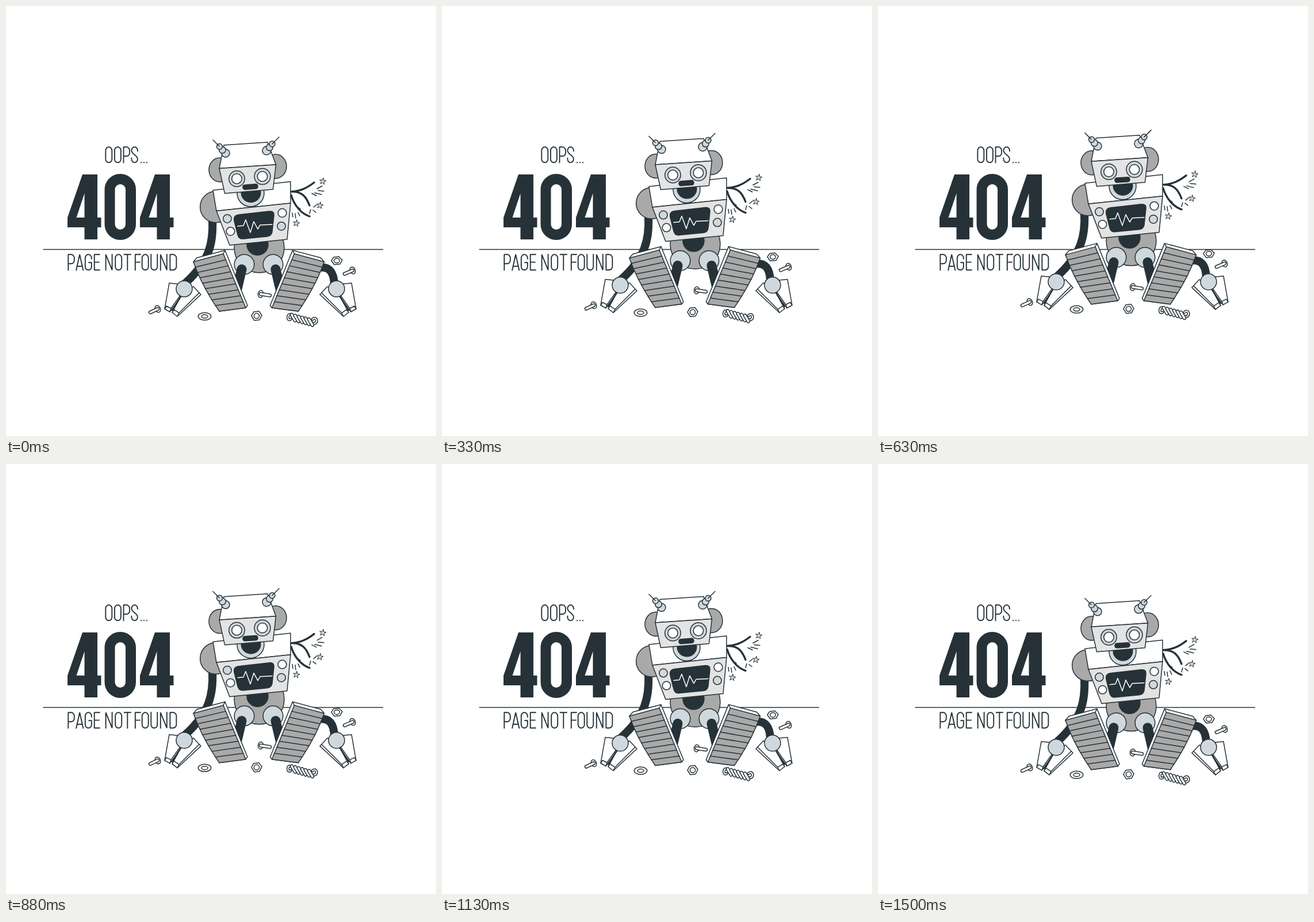
An HTML page for the animation above (1540 ms loop, 748x748 px).

```html
<!DOCTYPE html>
<html lang="en">
<head>
<meta charset="utf-8">
<title>Page not found</title>
<style>
  html, body { margin: 0; width: 100%; height: 100%; overflow: hidden; background: #fff; }
  svg { display: block; width: 100%; height: 100%; }
  #robot { fill: #fff; stroke: #263238; stroke-width: 1.5; stroke-linejoin: round; stroke-linecap: round; }
  .grey { fill: #a9a9a9; }
  .pale { fill: #e3e3e3; }
  .blue { fill: #cfd8dc; }
  .dark { fill: #263238; }
  .line { fill: none; }
  .limb { fill: none; stroke-width: 14; }
  .leg { fill: none; stroke-width: 17; }
  .wire { fill: none; stroke-width: 3.4; }
  .lettering { fill: none; stroke: #263238; stroke-width: 1.9; stroke-linecap: square; stroke-linejoin: bevel; }
</style>
</head>
<body>
<svg viewBox="0 0 748 748" role="img" aria-label="OOPS... 404 PAGE NOT FOUND">
  <defs>
    <g id="boot">
      <path d="M326 445L332 438 381 425 420 521 417 525 371 531Z"/>
      <path class="grey" d="M326 445L378 431 417 525 371 531Q340 486 326 445Z"/>
      <path class="line" d="M378 431L381 425"/>
      <path class="line" id="treads"/>
    </g>
    <g id="hand">
      <path d="M284 482L276 527 285 532 309 500 304 484Z"/>
      <path d="M306 502L289 533 298 540 339 502 326 488Z"/>
      <path class="line" d="M276 527L279 522 287 526 285 532M287 526L304 502M289 533L292 528 301 534 298 540M301 534L336 499"/>
      <path class="line" stroke-width="2.5" d="M305 504L289 529"/>
      <circle class="blue" cx="310" cy="492" r="14"/>
    </g>
  </defs>

  <g class="dark">
    <path id="four" fill-rule="evenodd" d="M133 293H159V368H165.5V385H159V406H136.5V385H107V368ZM136.5 326L122.5 368H136.5Z"/>
    <use href="#four" x="126"/>
  </g>
  <rect x="180.500" y="301" width="36.500" height="97" rx="18.200" fill="none" stroke="#263238" stroke-width="18"/>
  <path d="M64.5 423.500H656" stroke="#263238" stroke-width="1.500"/>
  <g class="lettering" id="lettering"></g>

  <g id="robot">
    <path class="limb" d="M359 372C361 412 354 444 312 482"/>
    <circle class="grey" cx="365" cy="349.500" r="27.300"/>

    <path class="wire" d="M496 323C512 322 523 317 536 307M496 323C514 322 522 331 528 347M496 329C501 346 513 361 528 366"/>
    <path class="line" d="M541 318L550 313M543 321L553 322M537 325L549 328M532 326L540 330M535 350L540 346M534 355L539 359M530 354L528 361M506 349L512 353M508 359L511 365M503 361L504 369M498 360L499 367"/>
    <g class="blue" id="stars" stroke-width="1"></g>

    <circle class="grey" cx="440.500" cy="420.500" r="43.500"/>
    <circle class="dark" cx="437.500" cy="415" r="18.500"/>
    <circle class="blue" cx="414.500" cy="449.500" r="17.300"/>
    <circle class="blue" cx="464.500" cy="449.500" r="17.300"/>
    <path class="leg" d="M410 458L402 492M469 458L477 492"/>

    <path d="M360 320.500L495 305.500V343L366 356.500Z"/>
    <path class="pale" d="M366 356.500L495 343 489 406 389 416Z"/>
    <path class="dark" d="M405 363L458 357Q467 356 466 365L463 393Q462 400 454 401L413 405Q405 406 403 398L397 374Q395 364 405 363Z"/>
    <path class="line" style="stroke:#fff" d="M403 383L413 382 417 372 425 394 431 375 438 388 442 381 463 380"/>
    <circle class="blue" cx="385" cy="370" r="7.200"/>
    <circle cx="390.500" cy="392" r="7.200"/>
    <circle cx="480.500" cy="360" r="7.400"/>
    <circle class="blue" cx="479" cy="383" r="7.200"/>

    <circle class="blue" cx="425.500" cy="325.500" r="23.500"/>
    <circle class="dark" cx="426" cy="324.500" r="16.800"/>
    <ellipse class="grey" cx="372" cy="285" rx="19" ry="21"/>
    <ellipse class="grey" cx="469" cy="279" rx="19" ry="21"/>
    <path d="M379 242L455 237 469.500 276 371 282.500Z"/>
    <path class="pale" d="M371 282.500L469.500 276 464.500 319 380.500 326Z"/>
    <circle class="blue" cx="401.500" cy="300.500" r="13.700"/>
    <circle cx="401.500" cy="300.500" r="8.700"/>
    <circle class="blue" cx="446" cy="296.500" r="14"/>
    <circle cx="446" cy="296.500" r="8.700"/>
    <rect class="dark" x="412" y="310.500" width="26" height="8" rx="3.500" transform="rotate(-4 425 314.500)"/>

    <g class="blue">
      <circle cx="382" cy="256" r="7"/><circle cx="376.500" cy="250.500" r="5.800"/><circle cx="371.500" cy="244.500" r="5"/>
      <circle cx="453.500" cy="251.500" r="7.500"/><circle cx="458.500" cy="246" r="5.800"/><circle cx="463" cy="240" r="5"/>
      <path class="line" d="M360 233L371 244M475 228L463 240"/>
    </g>

    <path class="limb" d="M546 455Q570 452 571 484"/>
    <use href="#boot"/>
    <use href="#boot" transform="matrix(-1 0 0 1 879.500 0)"/>
    <use href="#hand"/>
    <use href="#hand" transform="matrix(-1 0 0 1 885 0)"/>

    <path d="M566 443L570 437 579 436 585 442 581 449 571 450Z"/>
    <ellipse cx="575.500" cy="443" rx="4.800" ry="4"/>
    <path d="M427 539L431 532 440 531 445 538 441 546 432 547Z"/>
    <circle cx="436" cy="539" r="4.600"/>
    <ellipse cx="345.500" cy="540" rx="11.200" ry="6.500"/>
    <ellipse cx="345.500" cy="540" rx="5.500" ry="3"/>
    <g id="parts"></g>
  </g>
</svg>
<script>
const $ = id => document.getElementById(id);

// Condensed monoline capitals, 27 units high: [advance, path]
const glyphs = {
  O: [15.6, 'M0 6a5.5 6 0 0 1 11 0V21a5.5 6 0 0 1-11 0z'],
  P: [13.9, 'M0 27V0H5a5.5 6 0 0 1 5.5 6V10a5.5 6 0 0 1-5.5 6H0'],
  S: [13.6, 'M10.5 7V6a5.2 6 0 0 0-10.5 0C0 13 10.5 14 10.5 21a5.2 6 0 0 1-10.5 0v-1.5'],
  A: [15.6, 'M0 27L6 0 12 27M1.5 20.5H10.5'],
  G: [15.9, 'M11 7.5V6a5.5 6 0 0 0-11 0V21a5.5 6 0 0 0 11 0V14H6.5'],
  E: [13.4, 'M9 0H0V27H9M0 13.3H8'],
  N: [16.6, 'M0 27V0L11 27V0'],
  T: [12.5, 'M0 0H11M5.5 0V27'],
  F: [11.9, 'M9 0H0V27M0 13.3H8'],
  U: [16.5, 'M0 0V21a5.5 6 0 0 0 11 0V0'],
  D: [13, 'M0 0H5a6 6 0 0 1 6 6V21a6 6 0 0 1-6 6H0z'],
  '.': [5, 'M3 26.9V27'],
  ' ': [6.5, '']
};

function letter(text, x, y) {
  for (const char of text) {
    const [advance, d] = glyphs[char];
    $('lettering').innerHTML += `<path transform="translate(${x} ${y})" d="${d}"/>`;
    x += advance;
  }
}

function star(x, y) {
  const points = Array.from({ length: 10 }, (_, i) => {
    const r = i % 2 ? 2.5 : 6, a = i * Math.PI / 5 - 1.4;
    return [x + r * Math.cos(a), y + r * Math.sin(a)];
  });
  $('stars').innerHTML += `<polygon points="${points}"/>`;
}

function tube(d, width) {
  $('parts').innerHTML += `<path class="line" stroke-width="${width}" d="${d}"/>` +
    `<path class="line" style="stroke:#fff" stroke-width="${width - 3}" d="${d}"/>`;
}

function screw(x, y, dx, dy) {
  const angle = Math.atan2(dy, dx) * 180 / Math.PI;
  $('parts').innerHTML += `<ellipse cx="${x}" cy="${y}" rx="4.5" ry="6.2" transform="rotate(${angle} ${x} ${y})"/>`;
  tube(`M${x} ${y}l${dx} ${dy}`, 6.5);
}

letter('OOPS...', 173.3, 245.3);
letter('PAGE NOT FOUND', 108.3, 432.3);
[[551, 305], [546, 347], [505, 378]].forEach(p => star(...p));

let treads = '';
for (let i = 1; i < 9; i++) {
  const k = i / 9, j = 1 - k;
  const x = j * j * 326 + 2 * j * k * 340 + k * k * 371;
  const y = j * j * 445 + 2 * j * k * 486 + k * k * 531;
  treads += `M${x} ${y}L${378 + 39 * k} ${431 + 94 * k}`;
}
$('treads').setAttribute('d', treads);

screw(603, 460, -14, 6);
screw(443, 501, 16, 2.5);
screw(264, 527, -13, 6);
tube('M498 538Q490 534 490.5 543Q491 547 495 545', 5);
tube('M534 552Q541 553 540 546Q538 541 533 545', 5);
for (let i = 0; i < 6; i++) tube(`M${497 + i * 6} ${537 + i * 1.6}l6 10`, 6.5);

// Linear bob, stepped at 24 pictures per second
const LOOP = 1540, STEPS = 37, RISE = 14.96;
function draw(now) {
  const step = Math.floor((now % LOOP) * 0.024 + 0.1);
  const phase = (step + 1) / STEPS;
  const y = 0.8 - RISE * (1 - Math.abs(1 - 2 * phase));
  $('robot').setAttribute('transform', `translate(0 ${y})`);
  requestAnimationFrame(draw);
}
draw(performance.now());
</script>
</body>
</html>
```
